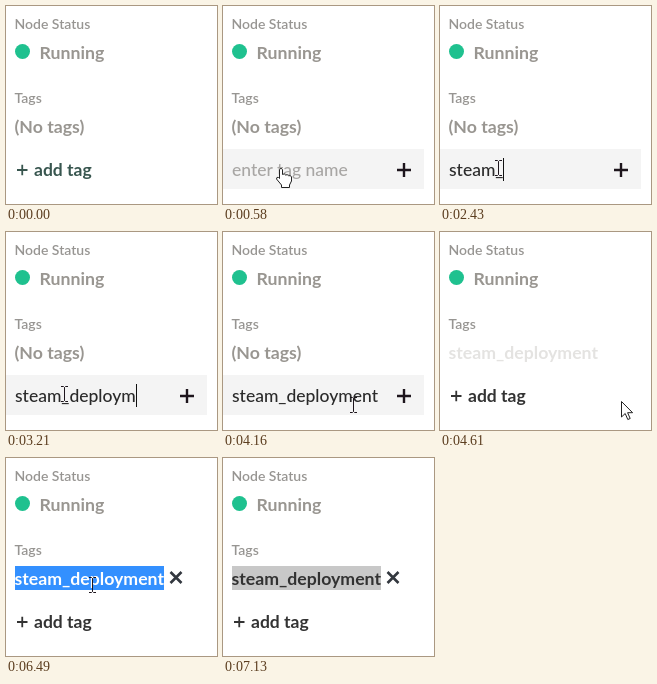
An HTML page that plays this animation: 211x198 px, repeating every 7.21 s.

```html
<!DOCTYPE html>
<html lang="en">
<head>
<meta charset="utf-8">
<title>Node tags</title>
<style>
  html, body { margin: 0; width: 100%; height: 100%; overflow: hidden; background: #fff; }
  svg { display: block; width: 100%; height: 100%; }
  text { font: 500 17.5px Lato, "Open Sans", sans-serif; white-space: pre; }
  .label { font-size: 14px; font-weight: 600; fill: #979592; }
  .bold { font-size: 17.7px; font-weight: 700; fill: #999691; }
  .line { fill: none; stroke: #1d151c; }
</style>
</head>
<body>
<svg viewBox="0 0 211 198">
  <text class="label" x="8.5" y="23">Node Status</text>
  <circle cx="16.5" cy="45.5" r="7.5" fill="#1fc18f"/>
  <text class="bold" x="33.5" y="53">Running</text>
  <text class="label" x="8.5" y="97">Tags</text>
  <text class="bold" id="none" x="8.5" y="127">(No tags)</text>

  <g id="tag">
    <rect id="mark" x="9" y="108" width="149" height="24"/>
    <text class="bold" id="name" x="8.5" y="127">steam_deployment</text>
    <path class="line" id="remove" d="M164.500 114l11 11m0-11l-11 11" stroke-width="2.6"/>
  </g>

  <g id="add">
    <path d="M11 164h10.500m-5.250-5.250v10.500" stroke="currentColor" stroke-width="1.8"/>
    <text x="28" y="170" style="font-weight:700;fill:currentColor">add tag</text>
  </g>

  <g id="field">
    <rect y="143" width="201" height="40" fill="#f4f4f4"/>
    <text id="hint" x="9" y="170" fill="#a8a6a4">enter tag name</text>
    <text id="typed" x="9" y="170" fill="#2a2a2a"></text>
    <path class="line" d="M174 164h14m-7-7v14" stroke-width="2.4"/>
    <rect id="caret" y="152" width="1" height="23" fill="#111"/>
  </g>

  <g id="arrow" fill="#fff" stroke="#222" stroke-linejoin="round">
    <path d="M.5.5v15.500l3.700-3.500 2.600 6 2.400-1-2.600-5.800h5z"/>
  </g>
  <g id="hand" fill="#fff" stroke="#222" stroke-linejoin="round">
    <path d="M-1.500 1.500q1.500-2.500 3 0v5q2-1.500 3 .5 2-1 3 .7 2.500-.7 3 1.300v4l-2 4v2.500h-8v-2.500l-5-6q0-2.500 2-1.500l1 1z"/>
  </g>
  <g id="beam">
    <path class="line" d="M-3.500-7.500h2.500l1 1 1-1h2.500M0-6.500v13M-3.500 7.500h2.500l1-1 1 1h2.500"/>
  </g>
</svg>
<script>
const LOOP = 7210, WORD = "steam_deployment";
const keys = [1590, 1740, 1820, 1970, 2120, 2430, 2600, 2670, 2760, 2830,
              2980, 3060, 3210, 3290, 3360, 3530];
// time, pointer shape, x, y
const moves = [
  [0, ""],
  [70, "arrow", 85, 184], [150, "arrow", 76, 176], [270, "hand", 64, 167], [350, "hand", 58, 162],
  [980, "beam", 58, 162],
  [3910, "beam", 76, 167], [3990, "beam", 104, 173], [4160, "beam", 130, 173],
  [4230, "beam", 160, 172], [4310, "hand", 181, 169],
  [4610, "arrow", 181, 169],
  [5320, "arrow", 166, 160], [5400, "arrow", 132, 141], [5480, "beam", 100, 125], [5560, "beam", 83, 120],
  [6490, "beam", 86, 127], [6570, "arrow", 89, 146], [6650, "arrow", 92, 178], [6730, ""]
];
const $ = id => document.getElementById(id);
const show = (id, on) => $(id).style.display = on ? "" : "none";
const within = (t, a, b) => t >= a && t < b;

function draw(t) {
  const editing = within(t, 580, 4610), saved = t >= 4610;
  const loaded = t >= 5710, selected = t >= 6030, blurred = t >= 7130;

  show("none", !saved);
  show("tag", saved);
  show("remove", loaded);
  show("mark", selected);
  $("mark").style.fill = blurred ? "#c8c8c8" : "#3390ff";
  $("name").style.fill = blurred ? "#323232" : selected ? "#fff" : loaded ? "#999691" : "#e4e3e1";
  $("remove").style.stroke = t < 6490 ? "#262c36" : "#33383f";

  show("add", !editing);
  $("add").style.color = t < 70 ? "#38564f" : "#333";

  const count = keys.filter(k => t >= k).length;
  show("field", editing);
  show("hint", !count);
  $("typed").textContent = WORD.slice(0, count);
  show("caret", within(t, 1110, 3990));
  $("caret").setAttribute("x", editing && count ? Math.round(9 + $("typed").getComputedTextLength()) : 9);

  const [, shape, x, y] = moves.findLast(m => t >= m[0]);
  for (const id of ["arrow", "hand", "beam"]) show(id, id === shape);
  if (shape) $(shape).setAttribute("transform", `translate(${x + (shape === "beam" ? .5 : 0)} ${y})`);
}

const start = performance.now();
function tick() {
  draw((performance.now() - start) % LOOP);
  requestAnimationFrame(tick);
}
tick();
</script>
</body>
</html>
```
